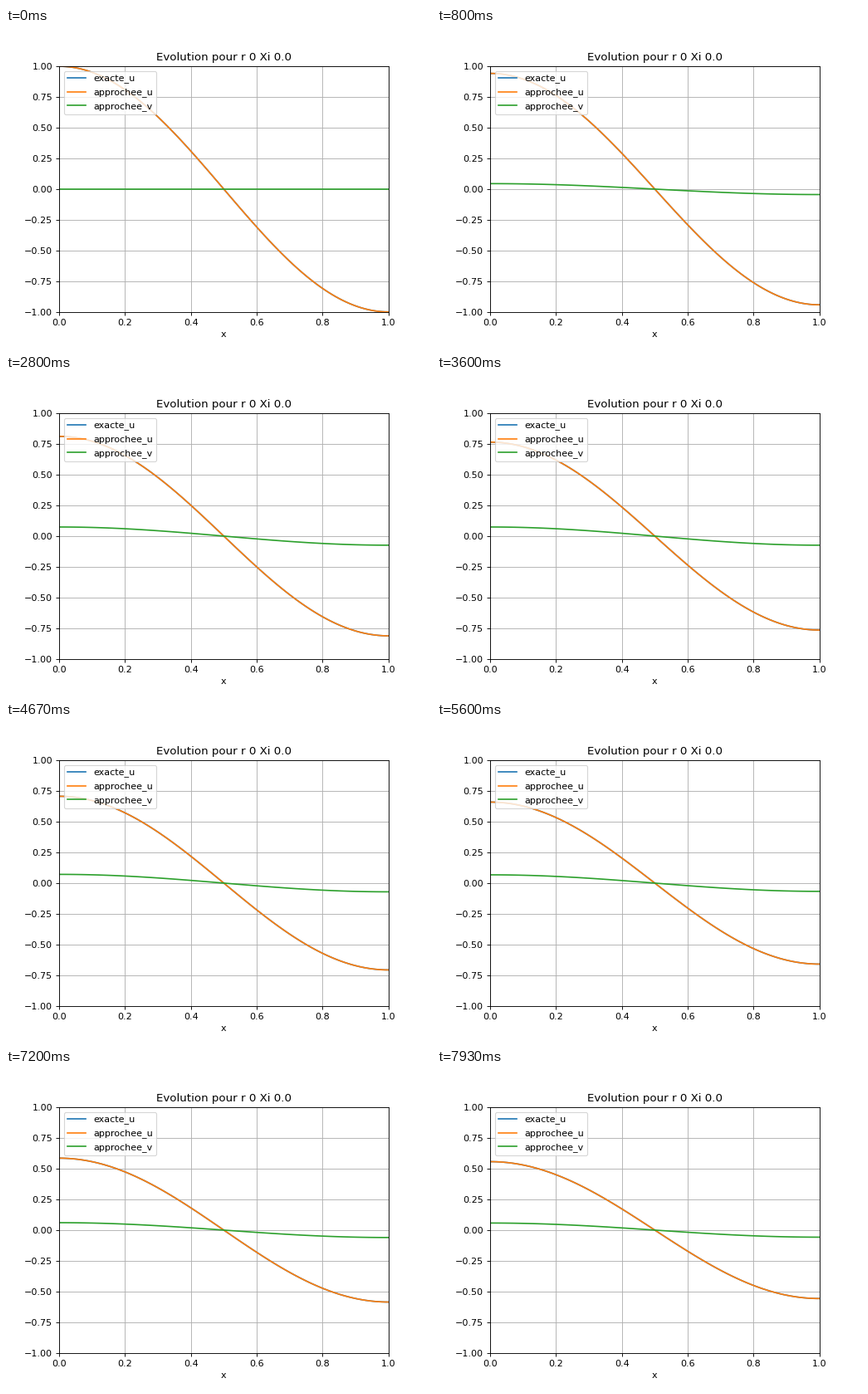
These frames come from a looping animation (512 px wide and 384 px high, 8 s). A matplotlib script:

```python
import numpy as np
import matplotlib.pyplot as plt
from matplotlib.animation import FuncAnimation

LOOP_MS = 8000
FRAMES = 120
DECAY = 0.0743   # decay of u per second
RATIO = 0.1035   # limit of v / u
RELAX = 0.76     # rate at which v / u settles

plt.rcParams["font.family"] = "DejaVu Sans"

fig, ax = plt.subplots(figsize=(6.4, 4.8), dpi=80)
x = np.linspace(0, 1, 101)
mode = np.cos(np.pi * x)


def amplitudes(t):
    u = np.exp(-DECAY * t)
    v = RATIO * (1 - np.exp(-RELAX * t)) * u
    return u, v


labels = ("exacte_u", "approchee_u", "approchee_v")
exact, approx_u, approx_v = (ax.plot(x, mode, label=name)[0] for name in labels)

ax.set_xlim(0, 1)
ax.set_ylim(-1, 1)
ax.set_yticks(np.linspace(-1, 1, 9))
ax.grid(True)
ax.set_xlabel("x")
ax.set_title("Evolution pour r 0 Xi 0.0")
ax.legend(loc="upper left")


def update(i):
    u, v = amplitudes(i * LOOP_MS / FRAMES / 1000)
    exact.set_ydata(u * mode)
    approx_u.set_ydata(u * mode)
    approx_v.set_ydata(v * mode)
    return exact, approx_u, approx_v


anim = FuncAnimation(fig, update, frames=FRAMES, interval=LOOP_MS / FRAMES,
                     repeat=True, repeat_delay=0, blit=False)
plt.show()
```
